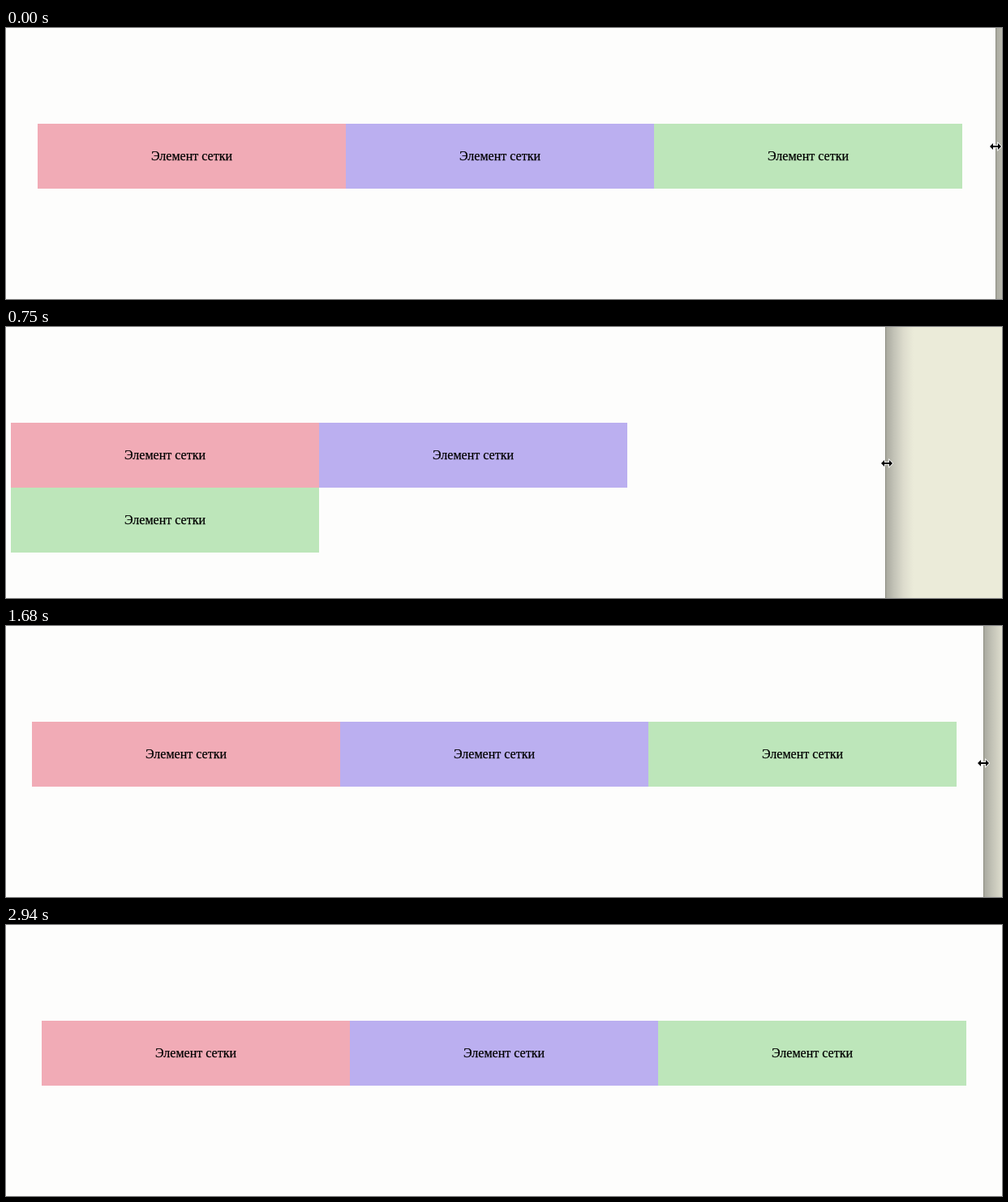
These frames come from a looping animation (1228 by 334 pixels, 2970 ms). An HTML page:

```html
<!DOCTYPE html>
<html lang="ru">
<head>
<meta charset="utf-8">
<title>Элемент сетки</title>
<style>
  html, body { margin: 0; width: 100%; height: 100%; overflow: hidden; background: #fdfdfc; }
  svg { display: block; width: 1228px; height: 334px; }
  text { font: 16px "Liberation Serif", "Times New Roman", serif; text-anchor: middle; stroke: #000; stroke-width: .25px; }
</style>
</head>
<body>
<svg viewBox="0 0 1228 334">
  <defs>
    <linearGradient id="shade">
      <stop offset="0" stop-color="#a6a69c"/>
      <stop offset=".3" stop-color="#c2c2b6"/>
      <stop offset=".65" stop-color="#dddccd"/>
      <stop offset="1" stop-color="#ebebd9"/>
    </linearGradient>
  </defs>
  <rect width="1228" height="334" fill="#fdfdfc"/>
  <g id="cells"></g>
  <g id="outside">
    <rect width="260" height="334" fill="#ebebd9"/>
    <rect width="35" height="334" fill="url(#shade)"/>
    <rect width="1" height="334" fill="#8c8c80"/>
  </g>
  <path id="cursor" d="M-7 0L-3-4V-1H3V-4L7 0L3 4V1H-3V4Z" stroke="#fff" stroke-width="1.6" paint-order="stroke"/>
</svg>
<script>
const LOOP = 2970, STEP = 30, CELL_W = 380, CELL_H = 80, TOP = 118;
const $ = id => document.getElementById(id);

$('cells').innerHTML = ['#f1abb6', '#bbaff0', '#bde6ba'].map(color =>
  `<g><rect width="${CELL_W}" height="${CELL_H}" fill="${color}"/>
   <text x="190" y="45">Элемент сетки</text></g>`).join('');
const cells = [...$('cells').children];

// Monotone cubic curve through the given points
function curve(xs, ys) {
  const n = xs.length;
  const slope = i => (ys[i + 1] - ys[i]) / (xs[i + 1] - xs[i]);
  const tangent = xs.map((_, i) => {
    if (i === 0) return slope(0) * 0.5;
    if (i === n - 1) return 0;
    const a = slope(i - 1), b = slope(i);
    return a * b <= 0 ? 0 : 2 * a * b / (a + b);
  });
  return t => {
    if (t >= xs[n - 1]) return ys[n - 1];
    let i = 0;
    while (t >= xs[i + 1]) i++;
    const h = xs[i + 1] - xs[i], u = (t - xs[i]) / h, v = 1 - u;
    return ys[i] * (1 + 2 * u) * v * v + tangent[i] * h * u * v * v
      + ys[i + 1] * u * u * (3 - 2 * u) - tangent[i + 1] * h * u * u * v;
  };
}

const times = [0, 510, 750, 1000, 1260, 1470, 1950, 2100];
const edge = curve(times, [1220, 1170, 1084, 1042, 1062, 1175, 1226, 1230]);
const pageWidth = curve(times, [1218, 1164, 1081, 1041, 1060, 1174, 1224, 1228]);
const cursorX = curve(times, [1220, 1166, 1086, 1042, 1074, 1179, 1227, 1240]);
const cursorY = curve(times, [146, 154, 168, 175, 176, 170, 168, 168]);

function place(node, x, y) {
  node.setAttribute('transform', `translate(${x} ${y})`);
}

function draw(t) {
  const width = pageWidth(t);
  const columns = width < 1152 ? 2 : 3;
  const left = columns === 2 ? 6 : Math.round((width - 3 * CELL_W) / 2);
  cells.forEach((cell, i) =>
    place(cell, left + i % columns * CELL_W, TOP + Math.floor(i / columns) * CELL_H));
  place($('outside'), Math.round(edge(t)), 0);
  place($('cursor'), Math.round(cursorX(t)), Math.round(cursorY(t)));
}

const start = performance.now();
function tick() {
  const t = (performance.now() - start) % LOOP;
  draw(Math.floor(t / STEP) * STEP);
  requestAnimationFrame(tick);
}
tick();
</script>
</body>
</html>
```
